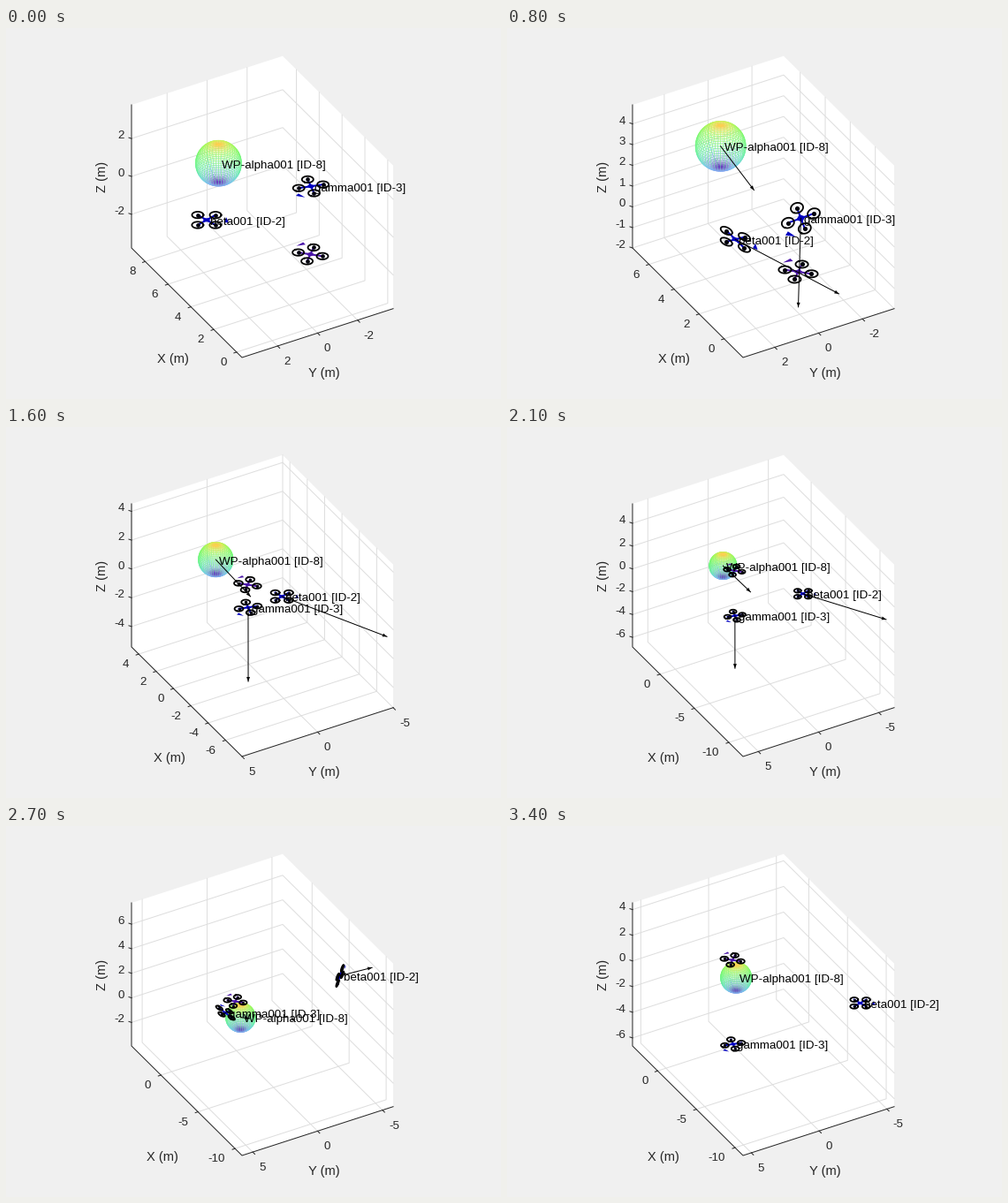
Animation, 560 px wide and 420 px high, one loop 3.5 s. Source, as a matplotlib script:

```python
import numpy as np
import matplotlib.pyplot as plt
from matplotlib.animation import FuncAnimation
from matplotlib.collections import LineCollection
from matplotlib.colors import LinearSegmentedColormap

W, H, DPI = 560, 420, 100
FRAMES, STEP = 35, 100
PX = 72 / DPI
INK = "#262626"

# Screen vectors of the plot box, from its front bottom corner.
CORNER = np.array([267.0, 373.0])
EX = np.array([-125.0, -124.0])
EY = np.array([171.0, -55.3])
EZ = np.array([0.0, -162.0])
ASPECT = 1.28
VIEW = np.array([-0.715, 0.408, 0.567])

# Cruise profile: speed up, hold, slow down.
RISE, FALL_AT, FALL = 1.2, 2.25, 0.65

SKY = LinearSegmentedColormap.from_list("sky", [
    (0, "#6a40c0"), (0.06, "#8898f8"), (0.2, "#78d8e8"), (0.4, "#68f498"),
    (0.7, "#78fa70"), (0.9, "#b8f858"), (0.97, "#f0e850"), (1, "#ffd050")])

fig = plt.figure(figsize=(W / DPI, H / DPI), dpi=DPI, facecolor="#f0f0f0")
ax = fig.add_axes([0, 0, 1, 1])


def speed(t):
    return np.clip(min(t / RISE, (FALL_AT + FALL - t) / FALL), 0, 1)


def distance(t):
    c = np.clip(t - FALL_AT, 0, FALL)
    return (min(t, RISE) ** 2 / (2 * RISE) + np.clip(t - RISE, 0, FALL_AT - RISE)
            + c - c * c / (2 * FALL))


def bump(t, mid, half):
    return np.cos(np.pi / 2 * np.clip((t - mid) / half, -1, 1)) ** 2


def track(t, *keys):
    """Eased path through (time, value) keys."""
    for (t0, a), (t1, b) in zip(keys, keys[1:]):
        if t <= t1:
            s = (t - t0) / (t1 - t0)
            return a + (b - a) * s * s * (3 - 2 * s)
    return keys[-1][1]


def motion(t):
    """Lead position, wing and goal (position, velocity), and wing pitch."""
    launch, brake = bump(t, 0.5, 0.5), bump(t, 2.7, 0.6)
    v, d = speed(t), distance(t)
    climb = np.interp(t, [0, 0.5, 2, 2.7, 3.4], [0, -1.3, 0, 1.3, 0])

    lead = np.array([0.16 - 0.12 * launch, 0, 0])
    x = 4.68 - 6.05 * d - track(t, (0, 0), (0.5, 0.55), (2.1, 0.45),
                                (2.7, -0.85), (3.4, 0.85))
    wing = np.array([x, 0.57 * x - 0.06 + 0.33 * launch - 0.8 * brake,
                     1.83 * launch + 4.4 * brake])
    wing_v = np.array([-6.05 * v, -3.45 * v - 0.35 * (launch + brake), climb])

    x = 8.2 - 4 * d - track(t, (0, 0), (0.5, 1.1), (1.2, 0.37), (2.1, 0.37),
                            (2.7, 0.97), (3.4, 0.6))
    z = track(t, (0, 0), (0.5, 3.7), (1.2, 0.25), (1.6, -0.45), (3.4, -1.1))
    goal = np.array([x, 0, z])
    goal_v = np.array([-4 * v, 0, climb / 2])
    return lead, (wing, wing_v), (goal, goal_v), 66 * (launch - brake)


def attitude(yaw, pitch):
    """Columns: forward, left, up."""
    a, b = np.radians([yaw, pitch])
    c, s = np.cos(a), np.sin(a)
    turn = np.array([[c, -s, 0], [s, c, 0], [0, 0, 1]])
    c, s = np.cos(b), np.sin(b)
    return turn @ np.array([[c, 0, s], [0, 1, 0], [-s, 0, c]])


RING = np.linspace(0, 2 * np.pi, 29)
CIRCLE = np.stack([np.cos(RING), np.sin(RING), 0 * RING], 1) * 0.25
ARMS = np.array([[x, y, 0] for x, y in ((1, 1), (1, -1), (-1, -1), (-1, 1))]) * 0.385
BODY = ARMS * 0.36
NOSE = np.array([[0.86, 0.21, 0], [0.75, -0.19, 0], [0.96, -0.19, 0]])


def sphere_lines():
    lon = np.linspace(0, 2 * np.pi, 49)
    lat = np.linspace(-np.pi / 2, np.pi / 2, 33)
    a, b = np.meshgrid(lon, lat)
    g = np.stack([np.cos(b) * np.cos(a), np.cos(b) * np.sin(a), np.sin(b)], -1)
    rows = np.stack([g[:, :-1], g[:, 1:]], 2).reshape(-1, 2, 3)
    cols = np.stack([g[:-1], g[1:]], 2).reshape(-1, 2, 3)
    return np.concatenate([rows, cols])


MESH = sphere_lines()
MESH_COLORS = SKY((MESH[:, :, 2].mean(1) + 1) / 2)


class Box:
    """Equal-scale limits around a cloud of points, with its projection."""

    def __init__(self, cloud):
        lo, hi = cloud.min(0), cloud.max(0)
        ratio = np.array([ASPECT, 1, 1])
        self.r = ((hi - lo) / ratio).max()
        self.lo = (lo + hi) / 2 - self.r * ratio / 2
        self.hi = self.lo + self.r * ratio
        self.scale = 196.8 / self.r

    def __call__(self, p):
        f = (np.asarray(p, float) - self.lo) / (self.hi - self.lo)
        return (CORNER + f[..., :1] * EX + (1 - f[..., 1:2]) * EY
                + f[..., 2:] * EZ)

    def ticks(self, axis, step):
        tol = 0.08
        first = np.ceil((self.lo[axis] - tol) / step)
        last = np.floor((self.hi[axis] + tol) / step)
        return [int(n * step) for n in np.arange(first, last + 1)]


def line(pts, color, width, z):
    pts = np.asarray(pts)
    ax.plot(pts[:, 0], pts[:, 1], color=color, lw=width * PX, zorder=z)


def fill(pts, color, z):
    ax.fill(pts[:, 0], pts[:, 1], fc=color, ec="none", zorder=z)


def label(x, y, s, size=13.33, color=INK, **kw):
    ax.text(x, y, s, fontsize=size * PX, color=color,
            family="Liberation Sans", zorder=30, **kw)


def draw_axes(box):
    left, right = CORNER + EX, CORNER + EY
    back = left + EY
    fill(np.array([left, left + EZ, back + EZ, right + EZ, right, CORNER]), "white", 0)
    xs = box.ticks(0, 2 if box.r < 8.5 or 9.6 < box.r < 10.4 else 5)
    ys = box.ticks(1, 2 if box.r < 9.5 else 5)
    zs = box.ticks(2, 1 if box.r < 7 else 2)
    (x0, y0, z0), (x1, y1, z1) = box.lo, box.hi
    out = np.array([-3, 1])

    def grid(*pts):
        line(box(np.clip(pts, box.lo, box.hi)), "#dedede", 1, 1)

    for x in xs:
        grid((x, y1, z0), (x, y0, z0), (x, y0, z1))
        p = box((np.clip(x, x0, x1), y1, z0))
        line([p, p + out], INK, 1, 3)
        label(p[0] - 11, p[1] + 15, str(x), ha="right")
    for y in ys:
        grid((x0, y, z0), (x1, y, z0), (x1, y, z1))
        p = box((x0, np.clip(y, y0, y1), z0))
        line([p, p + 2.4], INK, 1, 3)
        label(p[0] + 7, p[1] + 21, str(y), ha="left")
    for z in zs:
        grid((x1, y1, z), (x1, y0, z), (x0, y0, z))
        p = box((x1, y1, np.clip(z, z0, z1)))
        line([p, p - (3, 1)], INK, 1, 3)
        label(134, p[1], str(z), ha="right")
    line([left + EZ, left, CORNER, right], INK, 1, 3)

    wide = max(len(str(x)) for x in xs)
    label({1: 189, 2: 185}.get(wide, 177), 379, "X (m)", 14.67, ha="center")
    label(360, 395, "Y (m)", 14.67, ha="center")
    label(109 if min(zs) < 0 else 113, 168, "Z (m)", 14.67,
          ha="center", va="center", rotation=90)


def draw_arrow(box, pos, vel):
    a, b = box(pos), box(pos + vel)
    length = np.hypot(*(b - a))
    if length < 3:
        return
    d = (b - a) / length
    n = np.array([-d[1], d[0]])
    line([a, b], "black", 1, 12)
    fill(np.array([b, b - 5 * d + 2 * n, b - 5 * d - 2 * n]), "black", 12)


def draw_craft(box, pos, rot, color, z):
    def place(p):
        return box(pos + p @ rot.T)

    hubs = place(ARMS)
    line(hubs[[0, 2]], color, 2, z)
    line(hubs[[1, 3]], color, 2, z)
    fill(place(BODY), color, z)
    fill(place(NOSE), color, z)
    for arm in ARMS:
        line(place(CIRCLE + arm), "black", 1.8, z + 0.2)
    ax.plot(hubs[:, 0], hubs[:, 1], "o", color="#00000c", mew=0,
            ms=max(0.18 * box.scale, 3) * PX, zorder=z + 0.3)


def draw(i):
    ax.clear()
    ax.set(xlim=(0, W), ylim=(H, 0))
    ax.axis("off")

    lead, (wing, wing_v), (goal, goal_v), pitch = motion(i * STEP / 1000)
    mirror = np.array([1, -1, 1])
    crafts = [(lead, attitude(0, 0), "#4a16a8"),
              (wing, attitude(-120, pitch), "#0000c0"),
              (wing * mirror, attitude(120, pitch), "#0000c0")]
    moves = [(goal, goal_v), (wing, wing_v), (wing * mirror, wing_v * mirror)]

    cloud = [goal - 1, goal + 1] + [p + v for p, v in moves]
    for pos, rot, _ in crafts:
        cloud += [pos + (CIRCLE + arm) @ rot.T for arm in ARMS]
        cloud.append(pos + NOSE @ rot.T)
    box = Box(np.vstack(cloud))

    draw_axes(box)
    ax.add_collection(LineCollection(box(MESH + goal), colors=MESH_COLORS,
                                     linewidths=0.6 * PX, alpha=0.8, zorder=5))
    crafts.sort(key=lambda c: c[0] @ VIEW)
    for k, (pos, rot, color) in enumerate(crafts):
        draw_craft(box, pos, rot, color, 8 + k)
    names = ("WP-alpha001 [ID-8]", "beta001 [ID-2]", "gamma001 [ID-3]")
    for (pos, vel), name in zip(moves, names):
        draw_arrow(box, pos, vel)
        x, y = box(pos)
        label(x + 4, y + 5.5, name, color="black")


anim = FuncAnimation(fig, draw, frames=FRAMES, interval=STEP,
                     repeat=True, repeat_delay=0)
plt.show()
```
